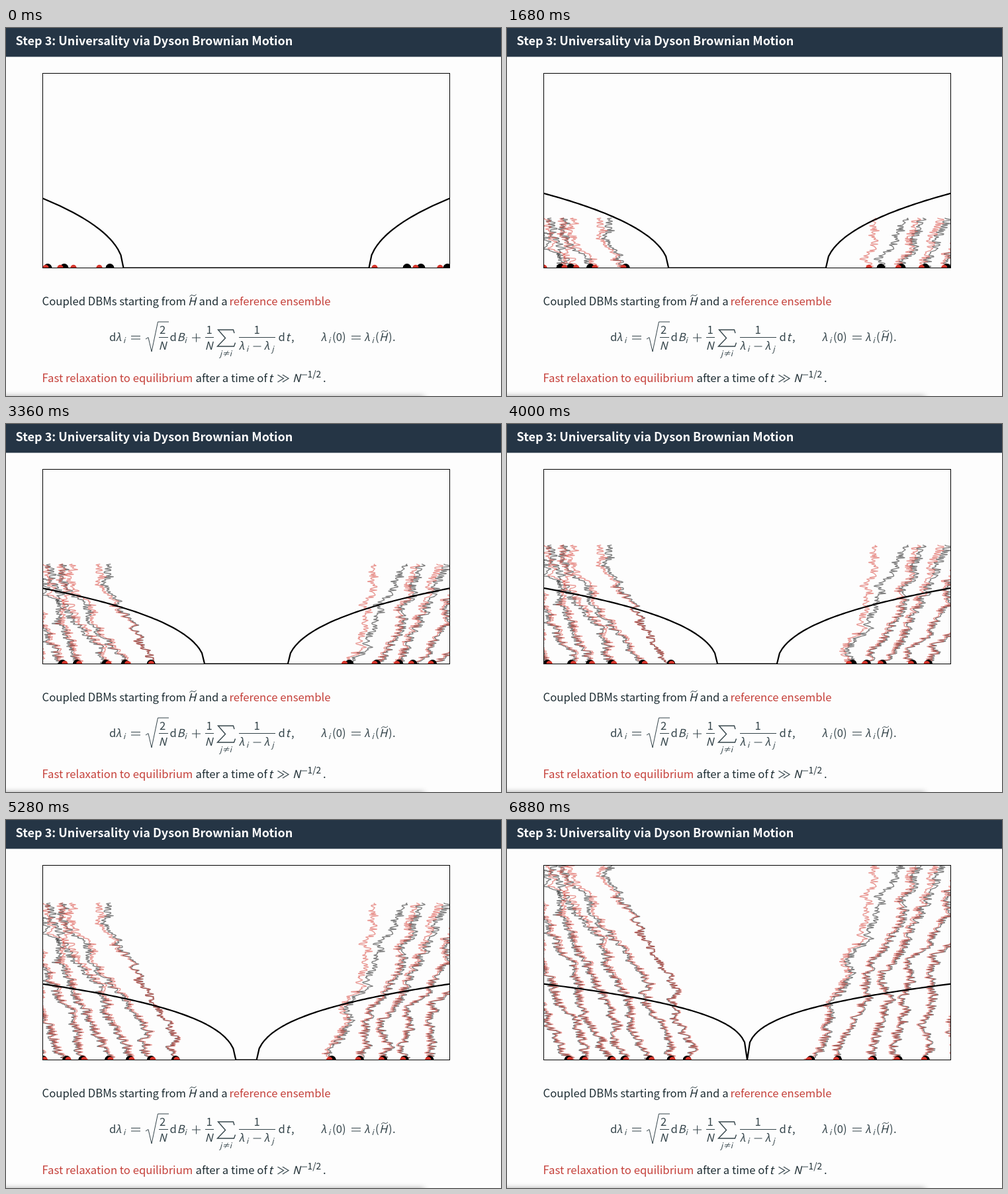
An HTML page with a canvas for the animation above (6.96 s loop, 748 px wide and 556 px high).

```html
<!DOCTYPE html>
<html lang="en">
<head>
<meta charset="utf-8">
<title>Dyson Brownian Motion</title>
<style>
  html, body { margin: 0; width: 100%; height: 100%; overflow: hidden; background: #fdfdfd; }
  svg, canvas { position: absolute; left: 0; top: 0; overflow: hidden; }
  text { font: 16.7px "Noto Sans CJK SC", "Noto Sans CJK JP", "Source Sans Pro", sans-serif; fill: #1f2e34; }
  .title { font-size: 18.07px; font-weight: 600; fill: #fdfdfd; }
  .red { fill: #c5403a; }
  .it { font-style: italic; }
  .math text { fill: #34444a; }
  .math .la { font: italic 16.5px "Noto Sans", "Open Sans", sans-serif; }
  .sub { font-size: 11.5px; font-style: italic; }
  .line { fill: none; stroke: #34444a; }
</style>
</head>
<body>
<svg width="748" height="556">
  <filter id="soft" x="-10%" y="-200%" width="120%" height="500%"><feGaussianBlur stdDeviation="5"/></filter>
  <rect x="-20" y="557" width="652" height="20" opacity=".4" filter="url(#soft)"/>
  <rect width="748" height="43.5" fill="#253545"/>
  <text class="title" x="14.5" y="26">Step 3: Universality via Dyson Brownian Motion</text>

  <text x="54.5" y="419">Coupled DBMs starting from</text>
  <text class="it" x="275" y="419">H</text>
  <text x="291.5" y="419">and a</text>
  <text class="red" x="337.5" y="419">reference ensemble</text>

  <g class="math">
    <text x="156" y="473">d</text><text class="la" x="167" y="473">λ</text><text class="sub" x="177" y="476">i</text>
    <text x="247.5" y="473">d</text><text class="it" x="258.5" y="473">B</text><text class="sub" x="269.5" y="476">i</text>
    <text x="232" y="462">2</text><text class="it" x="230.5" y="486">N</text>
    <text x="302.5" y="462">1</text><text class="it" x="300.5" y="486">N</text>
    <text class="sub" x="323" y="496">j≠i</text>
    <text x="374.5" y="462">1</text>
    <text class="la" x="353" y="486">λ</text><text class="sub" x="363" y="489">i</text>
    <text class="la" x="391" y="486">λ</text><text class="sub" x="401.5" y="489">j</text>
    <text x="411.5" y="473">d</text><text class="it" x="422.5" y="473">t</text><text x="431" y="473">,</text>
    <text class="la" x="477" y="473">λ</text><text class="sub" x="487" y="476">i</text><text x="493" y="473">(0)</text>
    <text class="la" x="542.5" y="473">λ</text><text class="sub" x="552.5" y="476">i</text><text x="558" y="473">(</text>
    <text class="it" x="564" y="473">H</text><text x="578" y="473">)</text><text x="584" y="473">.</text>
  </g>
  <path class="line" d="M189 465.5h14m-14 4.500h14 M281 468h13m-6.500-6.500v13 M373.500 481h12 M522 465.500h14m-14 4.500h14"/>
  <path class="line" d="M231 467.500h14 M301 467.500h13 M352 467.500h55"/>
  <path class="line" d="M211 470l4-2.500l5 21.500L229.500 444H246"/>
  <path class="line" stroke-width="1.400" d="M345 461l-1.500-5H320.500l11 12.500l-12 12.500h25l2-5.500"/>
  <path class="line" d="M277.500 405.500q2.500-3.500 5-1.500t5-1.500 M567 459.500q2.500-3.500 5-1.500t5-1.500"/>

  <text class="red" x="54.5" y="535">Fast relaxation to equilibrium</text>
  <text x="286.5" y="535">after a time of</text>
  <text class="it" x="396.5" y="535">t</text>
  <path class="line" stroke-width="1.200" d="M410.500 524l9 5.500l-9 5.500 M418 524l9 5.500l-9 5.500"/>
  <text class="it" x="433" y="535">N</text>
  <path class="line" d="M446.500 524h8.500"/>
  <text x="455.5" y="528" style="font-size:13.8px">1/2</text>
  <text x="479" y="535">.</text>
</svg>
<canvas id="plot" width="748" height="556"></canvas>
<script>
const ctx = document.getElementById('plot').getContext('2d');
const LEFT = 55.5, RIGHT = 670.5, TOP = 68.5, BASE = 362.5, MID = 363;
const LOOP = 6960, FRAME = 80, HALF = 3440, SAMPLE = FRAME / 3, RISE = 0.0449;
const RED = '213,52,42', BLACK = '0,0,0';

// Starting positions, then evenly spaced targets halfway and at the end.
const groups = [
  { side: -1, red: [141, 102, 82, 60], black: [157, 88, 63, 48], mid: 228, midGap: 34, end: 278, endGap: 32 },
  { side: 1, red: [557, 619, 656, 692], black: [606, 627, 667, 697], mid: 517, midGap: 33, end: 459, endGap: 42 }
];

const particles = groups.flatMap(({ side, red, black, mid, midGap, end, endGap }, g) =>
  Array.from({ length: 7 }, (_, j) => {
    const k = Math.min(j, 3);
    return {
      side, seed: g * 5000 + j * 613,
      start: red[k] + side * 24 * (j - k),
      shift: black[k] - red[k],
      mid: mid + side * midGap * j,
      end: end + side * endGap * j
    };
  }));

function random(n) {
  const v = Math.sin(n * 12.9898) * 43758.5453;
  return (v - Math.floor(v)) * 2 - 1;
}

function smoothNoise(seed, u) {
  const k = Math.floor(u), f = u - k, a = random(seed + k);
  return a + (random(seed + k + 1) - a) * f * f * (3 - 2 * f);
}

function position(p, t, black) {
  const u = t / HALF;
  const drift = u < 1 ? p.start + (p.mid - p.start) * u ** 1.5 : p.mid + (p.end - p.mid) * (u - 1);
  const settle = Math.min(1, t / 500);
  const wander = 10 * smoothNoise(p.seed + 7, t / 700) + 6 * smoothNoise(p.seed + 99, t / 200);
  const shift = black ? p.shift * Math.exp(-t / 1500) + 2 * p.side * settle : 0;
  return drift + settle * wander + shift;
}

function trail(p, t, black) {
  ctx.beginPath();
  for (let n = 0; n * SAMPLE < t; n++) {
    const s = n * SAMPLE;
    ctx.lineTo(position(p, s, black) + 7.5 * random(p.seed + 200 + n), BASE - RISE * (t - s));
  }
  ctx.lineTo(position(p, t, black), BASE);
  ctx.strokeStyle = `rgba(${black ? BLACK : RED},.5)`;
  ctx.lineWidth = 1.4;
  ctx.stroke();
}

function dot(p, t, black) {
  ctx.beginPath();
  ctx.arc(position(p, t, black), BASE, black ? 6.5 : 4.7, 0, 7);
  ctx.fillStyle = `rgb(${black ? BLACK : RED})`;
  ctx.fill();
}

// Density near a gap, d measured in units of the gap width.
function edgeShape(d) {
  const r = Math.sqrt(d * (1 + d)), a = 1 + 2 * d + 2 * r;
  return r / (a ** (2 / 3) + a ** (-2 / 3) + 1);
}

function density(t) {
  const half = 185.5 * Math.max(0, 1 - t / 6540) ** 1.5;
  const gap = Math.max(2 * half, 0.01), span = MID - half - LEFT;
  const scale = (105 + 9.8 * (1 - Math.exp(-t / 1100))) / edgeShape(span / gap);
  const count = Math.ceil(span / 4);
  ctx.beginPath();
  for (let n = -count; n <= count; n++) {
    const d = 4 * Math.abs(n), y = BASE - scale * edgeShape(d / gap);
    if (n <= 0) ctx.lineTo(MID - half - d, y);
    if (n >= 0) ctx.lineTo(MID + half + d, y);
  }
  ctx.strokeStyle = `rgb(${BLACK})`;
  ctx.lineWidth = 2.2;
  ctx.stroke();
}

function draw(now) {
  const t = Math.floor(now % LOOP / FRAME) * FRAME;
  ctx.clearRect(0, 0, 748, 556);
  ctx.save();
  ctx.beginPath();
  ctx.rect(LEFT, TOP, RIGHT - LEFT, BASE - TOP + 0.5);
  ctx.clip();
  ctx.lineJoin = 'bevel';
  for (const black of [true, false]) particles.forEach(p => trail(p, t, black));
  density(t);
  for (const black of [true, false]) particles.forEach(p => dot(p, t, black));
  ctx.restore();
  ctx.strokeStyle = `rgb(${BLACK})`;
  ctx.lineWidth = 1;
  ctx.strokeRect(LEFT, TOP, RIGHT - LEFT, BASE - TOP);
}

const start = performance.now();
function tick() {
  draw(performance.now() - start);
  requestAnimationFrame(tick);
}
tick();
</script>
</body>
</html>
```
